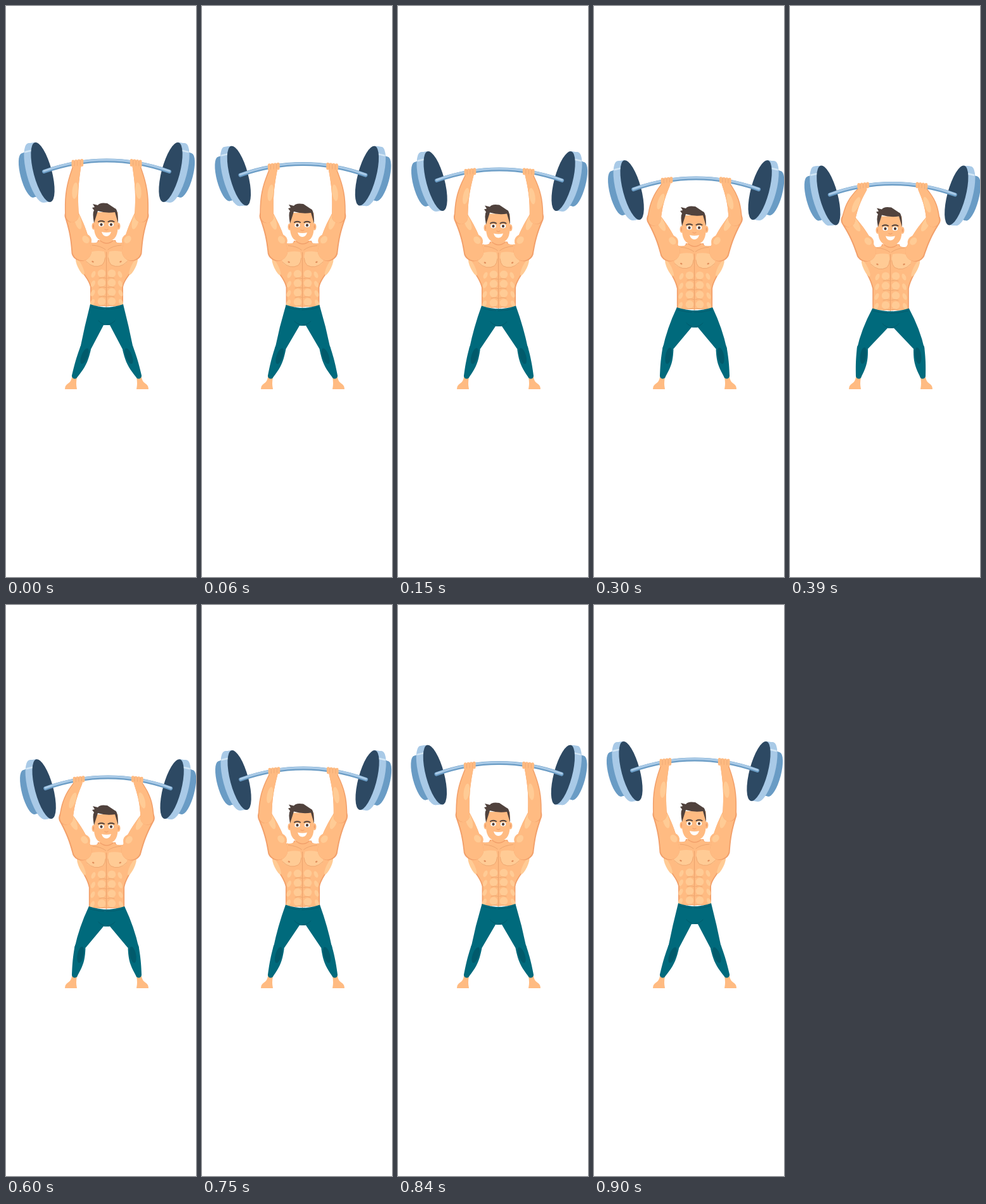
An HTML page with a canvas that plays this animation: 300x900 px, repeating every 930 ms.

```html
<!DOCTYPE html>
<html lang="en">
<head>
<meta charset="utf-8">
<title>Overhead press</title>
<style>
html, body { margin: 0; width: 100%; height: 100%; overflow: hidden; background: #fff; }
canvas { display: block; width: 300px; height: 900px; }
</style>
</head>
<body>
<canvas id="stage" width="300" height="900"></canvas>
<script>
const ctx = document.getElementById('stage').getContext('2d');
const STEP = 30, STEPS = 31, AXIS = 159, TILT = -0.26;
const SKIN = '#ffbb82', LIGHT = '#ffcb95', SHADE = '#f2a06b', LINE = '#eda56f';
const TEAL = '#006a7c', DEEP = '#015a6b', HAIR = '#50423d';
const NAVY = '#2d4963', PALE = '#a9cae7', BLUE = '#6a9cc5';

let u = 0; // 0 = arms raised, 1 = lowered
const mix = (a, b, t = u) => a + (b - a) * t;
const point = (x0, y0, x1, y1) => ({ x: mix(x0, x1), y: mix(y0, y1) });

function fill(path, color) {
  ctx.fillStyle = color;
  ctx.fill(path);
}

// Fill with a darker rim left uncovered by a shifted copy.
function rimmed(path, dx, dy) {
  ctx.save();
  fill(path, SHADE);
  ctx.clip(path);
  ctx.translate(dx, dy);
  fill(path, SKIN);
  ctx.restore();
}

function oval(x, y, rx, ry, color, turn = 0) {
  const path = new Path2D();
  path.ellipse(x, y, rx, ry, turn, 0, 7);
  fill(path, color);
}

function stroke(d, color, width) {
  ctx.strokeStyle = color;
  ctx.lineWidth = width;
  ctx.lineCap = 'round';
  ctx.stroke(new Path2D(d));
}

function moved(dx, dy, draw) {
  ctx.save();
  ctx.translate(dx, dy);
  draw();
  ctx.restore();
}

function bothSides(draw) {
  for (const side of [1, -1]) {
    ctx.save();
    if (side < 0) {
      ctx.translate(2 * AXIS, 0);
      ctx.scale(-1, 1);
    }
    draw(side);
    ctx.restore();
  }
}

// Position at share t of a bone, pushed sideways (positive = away from the body).
function along(a, b, t, out) {
  const angle = Math.atan2(b.y - a.y, b.x - a.x);
  return {
    x: mix(a.x, b.x, t) - out * Math.sin(angle),
    y: mix(a.y, b.y, t) + out * Math.cos(angle),
    angle
  };
}

// Tapered limb with round ends and a muscle bulge on either side.
function limb(a, b, wa, wb, outer, inner) {
  const path = new Path2D(), { angle } = along(a, b, 0, 0), q = Math.PI / 2;
  const edge = (t, sign, bulge) => {
    const p = along(a, b, t, sign * (mix(wa, wb, t) + bulge * Math.sin(Math.PI * t)));
    path.lineTo(p.x, p.y);
  };
  for (let i = 0; i <= 10; i++) edge(i / 10, 1, outer);
  path.arc(b.x, b.y, wb, angle + q, angle - q, true);
  for (let i = 10; i >= 0; i--) edge(i / 10, -1, inner);
  path.arc(a.x, a.y, wa, angle - q, angle + q, true);
  return path;
}

function spot(a, b, t, out, rx, ry, color) {
  const p = along(a, b, t, out);
  oval(p.x, p.y, ry, rx, color, p.angle);
}

function plates() {
  for (let i = 0; i <= 8; i++) oval(34 + i, 267 - i * 0.3, 11, 36, BLUE, TILT);
  for (let i = 0; i <= 10; i++) oval(47 + i, 263 - i * 0.1, 14.4, 48.2, PALE, TILT);
  stroke('M30.5 230 L39 228', '#d3e7f6', 2.5);
  oval(58, 262, 14.4, 48.4, NAVY, TILT);
}

function bar() {
  stroke('M60 261 Q159 226 258 261', BLUE, 6);
  stroke('M60 260 Q159 225 258 260', PALE, 3.4);
}

function fingers() {
  const h = mix(12, 9.5);
  for (let i = 0; i < 4; i++) {
    const x = 103.5 + i * 4.6, y = 242.6 - i * 0.5, path = new Path2D();
    path.roundRect(x, y, 4.9, h, 2.3);
    fill(path, SKIN);
    if (i) stroke(`M${x} ${y + 2} v${h - 4}`, LINE, 0.7);
  }
}

function torso() {
  const neck = 369 + 7 * u, side = mix(109, 112), waist = mix(133, 130);
  rimmed(new Path2D(`M163 ${neck} H145 Q145 ${neck + 6} 134 ${neck + 4} L${side} 388
    C${side} 415 ${waist - 4} 425 ${waist} ${443 + 3 * u}
    V${473 + 7 * u} H163 Z`), 1.8, -0.5);
}

function chest() {
  const d = 4.5 * u;
  oval(mix(117, 120), 411 + 3 * u, 3.5, 14, LIGHT, -0.45);
  moved(u, d, () => {
    const pec = new Path2D('M128 390 Q141 384 155 387 Q159 399 152 408 Q139 414 128 405 Q124 397 128 390Z');
    fill(pec, LIGHT);
    stroke('M127 403 Q139 415 152 408 Q156 404 156.5 397', LINE, 0.9);
    oval(137, 403, 1.8, 1.2, '#e08e5c', 0.4);
    stroke('M136 377 Q150 378 157 384', LINE, 1);
  });
  for (let i = 0; i < 4; i++) {
    const y = 415 + i * 14.7 + d + i * 0.7 * u;
    oval(151, y + 6.5, 6.3, 6.2, LIGHT);
    stroke(`M147 ${y + 14} Q152 ${y + 11.5} 158 ${y + 14}`, LINE, 0.9);
    oval(138 - 0.5 * i, y + 8, 3, 5.5, LIGHT, 0.4);
  }
}

function leg() {
  const knee = point(125.5, 540, 113.5, 540), ankle = { x: 108.5, y: 583 };
  const waist = point(133, 470, 130, 477), fork = 503 + 5 * u;
  const bend = (waist.x + knee.x - 8.5) / 2 - 1 - 5 * u;
  fill(new Path2D(`M163 ${waist.y + 5} Q146 ${waist.y + 5} ${waist.x} ${waist.y}
    Q${bend} ${mix(505, 510)} ${knee.x - 8.5} ${knee.y}
    H${knee.x + 9} L154 ${fork} H163 Z`), TEAL);
  fill(limb(knee, ankle, 8.7, 4.6, 0.8, 3.2), TEAL);
  spot(knee, ankle, 0.25, -3, 5, 13, DEEP);
  stroke(`M${AXIS} ${fork - 1} Q151 ${fork - 1} 146 ${fork - 7}`, DEEP, 1);
  stroke(`M${waist.x + 1} ${waist.y + 4} Q146 ${waist.y + 8} 160 ${waist.y + 8}`, DEEP, 0.9);
}

function arm(side) {
  const wrist = point(112, 252, 112 + 3 * side, 291);
  const elbow = point(104, 330, 91, 338);
  const shoulder = point(119, 386, 120, 387);
  const deltoid = point(126, 369, 123, 372);
  oval(deltoid.x, deltoid.y, 9, 10, SKIN, -0.5);
  rimmed(limb(elbow, shoulder, 11.5, 16, -2, 2), 1.8, -1);
  oval(deltoid.x, deltoid.y - 1, 5, 6.5, LIGHT, -0.7);
  spot(elbow, shoulder, 0.18, -7, 5, 14, LIGHT);
  rimmed(limb(wrist, elbow, 6.5, 11, 4.5, -2.5), 1.6, 0);
  spot(wrist, elbow, 0.5, -1, 4.5, 13, LIGHT);
}

function head() {
  stroke('M149 370 Q159 378 169 370', SHADE, 1.6);
  for (const x of [138.5, 177.5]) {
    oval(x, 347, 3, 5.5, SKIN);
    oval(x, 347, 1.3, 3, SHADE);
  }
  fill(new Path2D('M139 325 H176.5 V350 Q176 371 158 371 Q140 371 139 350Z'), SKIN);
  fill(new Path2D(`M139 342 Q136 326 139 322 L136 318 L140 317 L137 312 L145 314
    Q148 309 160 311 L172 319 Q177 320 177 342 L172 325 Q158 327 145 323 Z`), HAIR);
  for (const x of [150.5, 166]) {
    oval(x, 344.5, 4.2, 3.2, '#fff');
    oval(x, 344.5, 2.1, 2.3, '#54403a');
    stroke(`M${x - 4.5} 340 Q${x} 337.5 ${x + 4.5} 340`, HAIR, 2);
  }
  stroke('M156 352 Q158.5 354 161 352', SHADE, 1.3);
  fill(new Path2D('M151 356 Q158.5 358 166 356 Q164 363 158.5 363 Q153 363 151 356Z'), '#fff');
}

function draw() {
  const dx = 3 * u, dy = 39.3 * u;
  ctx.fillStyle = '#fff';
  ctx.fillRect(0, 0, 300, 900);
  moved(dx, dy, () => bothSides(plates));
  bothSides(() => fill(new Path2D('M104 585 H112 Q110 595 112 604 H93 Q93 598 98 595 Q103 592 104 585Z'), SKIN));
  bothSides(torso);
  bothSides(chest);
  stroke(`M${AXIS - 0.5} ${388 + 4 * u} V${474 + 7 * u}`, LINE, 1.2);
  bothSides(leg);
  bothSides(arm);
  moved(dx, dy, () => {
    bar();
    bothSides(fingers);
  });
  moved(0, 7 * u, head);
}

function tick() {
  const n = Math.floor(performance.now() / STEP) % STEPS;
  u = Math.min(n, STEPS - 1 - n) / 14;
  draw();
  requestAnimationFrame(tick);
}
tick();
</script>
</body>
</html>
```
